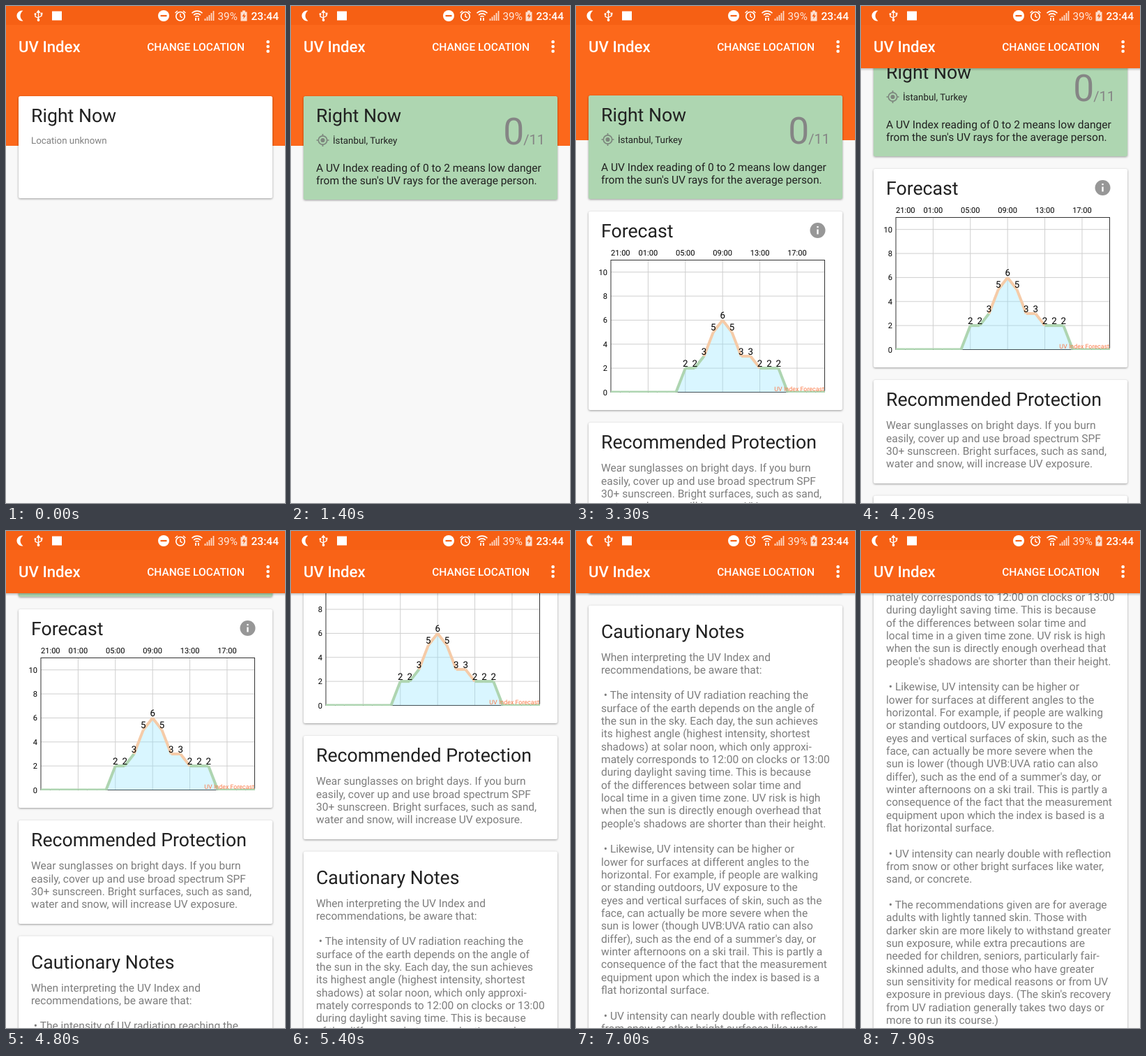
These frames come from a looping animation (400x711 px, 8000 ms). An HTML page:

```html
<!DOCTYPE html>
<html lang="en">
<head>
<meta charset="utf-8">
<title>UV Index</title>
<style>
  html, body { margin: 0; width: 100%; height: 100%; overflow: hidden; background: #f8f8f8; }
  svg { display: block; width: 400px; height: 711px; }
  text { font-family: Roboto, sans-serif; font-size: 15.56px; white-space: pre; text-rendering: geometricPrecision; fill: #212121; }
  .card { fill: #fff; filter: drop-shadow(0 1.5px 1.8px rgba(0, 0, 0, .38)); }
  .title { font-size: 26.67px; }
  .small { font-size: 13.33px; }
  .body text { fill: #7d7d7d; }
  .axis { font-size: 11.1px; fill: #000; }
  .value { font-size: 13.33px; fill: #000; text-anchor: middle; }
  .mid { text-anchor: middle; }
  .end { text-anchor: end; }
  .bar text { fill: #fff; }
  .medium { font-weight: 500; }
  .line { fill: none; stroke: #fff; }
</style>
</head>
<body>
<svg viewBox="0 0 400 711">
  <defs>
    <clipPath id="plot"><rect x="50" y="360" width="307" height="194"/></clipPath>
    <linearGradient id="fade" x2="0" y2="1">
      <stop stop-opacity=".22"/><stop offset="1" stop-opacity="0"/>
    </linearGradient>
  </defs>

  <rect width="400" height="711" fill="#f8f8f8"/>
  <rect id="header" width="400" height="200"/>

  <g id="content">
    <rect id="nowCard" class="card" x="18" y="129" width="364" height="146" rx="2.5"/>
    <text class="title" x="36" y="166">Right Now</text>
    <text id="unknown" class="small" x="36" y="196.5" style="fill:#808080">Location unknown</text>
    <g id="reading">
      <g fill="none" stroke="#7d877e" stroke-width="1.7">
        <circle cx="45.5" cy="192" r="6.2"/>
        <path d="M45.5 183v3M45.5 198v3M36.5 192h3M51.5 192h3"/>
        <circle cx="45.5" cy="192" r="3.1" fill="#7d877e" stroke="none"/>
      </g>
      <text class="small" x="60" y="196.5">İstanbul, Turkey</text>
      <text class="end" x="334.2" y="197.5" style="font-size:53.33px;fill:#858585">0</text>
      <text class="end" x="364" y="197.5" style="font-size:20px;fill:#858585">/11</text>
      <text x="36" y="236.8">A UV Index reading of 0 to 2 means low danger</text>
      <text x="36" y="255.1">from the sun's UV rays for the average person.</text>
    </g>

    <g id="more">
      <rect class="card" x="18" y="295" width="364" height="284" rx="2.5"/>
      <text class="title" x="36" y="332">Forecast</text>
      <circle cx="346.5" cy="322" r="11" fill="#979797"/>
      <path d="M346.5 316v2.3M346.5 320.5v7" stroke="#fff" stroke-width="2.3"/>
      <g id="grid" stroke="#cfcfcf"></g>
      <rect x="50" y="364.5" width="306.5" height="189" fill="none" stroke="#333"/>
      <g clip-path="url(#plot)">
        <path id="area" fill="rgb(140,226,255)" fill-opacity=".33"/>
        <g id="curve" stroke-width="4"></g>
      </g>
      <g id="labels"></g>
      <text class="end" x="356" y="552" style="font-size:8.89px;fill:#fb7a48">UV Index Forecast</text>

      <rect class="card" x="18" y="597" width="364" height="148" rx="2.5"/>
      <text class="title" x="36" y="634">Recommended Protection</text>
      <g id="advice" class="body"></g>

      <rect class="card" x="18" y="762.5" width="364" height="860" rx="2.5"/>
      <text class="title" x="36" y="808.5">Cautionary Notes</text>
      <g id="notes" class="body"></g>
    </g>
  </g>

  <g class="bar">
    <rect id="shade" y="89" width="400" height="4" fill="url(#fade)"/>
    <rect id="toolbar" width="400" height="89"/>
    <rect width="400" height="27" fill="#f66014"/>
    <text class="medium" x="18" y="66" style="font-size:22.22px">UV Index</text>
    <text class="medium end" x="342" y="64">CHANGE LOCATION</text>
    <g fill="#fff">
      <circle cx="375.6" cy="51.3" r="2.3"/><circle cx="375.6" cy="58" r="2.3"/><circle cx="375.6" cy="64.7" r="2.3"/>
      <path d="M24.5 6.8a7.4 7.4 0 1 0 0 14.4a8.5 8.5 0 0 1 0-14.4z"/>
      <rect x="66" y="7.5" width="14" height="13"/>
      <circle cx="226" cy="14" r="8"/>
      <path d="M221.5 14h9" stroke="#f66014" stroke-width="2.2"/>
    </g>
    <g class="line" stroke-width="1.4">
      <path d="M46.5 8v11M42 11.5v3.5l4.5 2.5M51 11v3l-4.5 2.5"/>
      <circle cx="46.5" cy="20" r="1.2" fill="#fff"/><path d="M44.7 9l1.8-2.4l1.8 2.4z" fill="#fff"/>
      <circle cx="42" cy="11.5" r=".8"/><path d="M50.3 10.3h1.4v1.4h-1.4z"/>
      <circle cx="250" cy="14.7" r="6.2" stroke-width="1.7"/>
      <path d="M250 11v4l2.8 1.7M242.5 10l3.5-3M257.5 10l-3.5-3"/>
      <path d="M266.5 10.3a10.5 10.5 0 0 1 15 0M269 13a7 7 0 0 1 10 0M271.5 15.5a3.5 3.5 0 0 1 5 0" stroke-width="1.6"/>
      <path d="M272 17v4M276 17v4" stroke-width="1.8"/>
      <path d="M285.5 21v-3M288.5 21v-5.5M291.5 21v-8M294.5 21v-11M297.5 21v-14" stroke-width="1.7" opacity=".8"/>
    </g>
    <text x="303.5" y="20" style="font-size:15.3px" opacity=".85">39%</text>
    <path d="M336.5 8.5h2.5v-2h4v2h2.5v13h-9z" fill="#fff" opacity=".8"/>
    <path d="M342 10l-3.5 5h2.5l-1 4l4-5.5h-2.5z" fill="#f66014"/>
    <text class="medium end" x="391" y="20">23:44</text>
  </g>
</svg>

<script>
const $ = id => document.getElementById(id);
const LOOP = 8000, STEP = 100, COLLAPSE = 111;

function add(parent, tag, attrs, text = '') {
  const el = document.createElementNS('http://www.w3.org/2000/svg', tag);
  for (const key in attrs) el.setAttribute(key, attrs[key]);
  el.textContent = text;
  return parent.appendChild(el);
}

function paragraph(parent, top, copy) {
  copy.split('\n').forEach((line, i) => {
    if (line) add(parent, 'text', { x: 36, y: top + i * 18.333 }, line);
  });
}

paragraph($('advice'), 667.3, `Wear sunglasses on bright days. If you burn
easily, cover up and use broad spectrum SPF
30+ sunscreen. Bright surfaces, such as sand,
water and snow, will increase UV exposure.`);

paragraph($('notes'), 841.5, `When interpreting the UV Index and
recommendations, be aware that:

 • The intensity of UV radiation reaching the
surface of the earth depends on the angle of
the sun in the sky. Each day, the sun achieves
its highest angle (highest intensity, shortest
shadows) at solar noon, which only approxi-
mately corresponds to 12:00 on clocks or 13:00
during daylight saving time. This is because
of the differences between solar time and
local time in a given time zone. UV risk is high
when the sun is directly enough overhead that
people's shadows are shorter than their height.

 • Likewise, UV intensity can be higher or
lower for surfaces at different angles to the
horizontal. For example, if people are walking
or standing outdoors, UV exposure to the
eyes and vertical surfaces of skin, such as the
face, can actually be more severe when the
sun is lower (though UVB:UVA ratio can also
differ), such as the end of a summer's day, or
winter afternoons on a ski trail. This is partly a
consequence of the fact that the measurement
equipment upon which the index is based is a
flat horizontal surface.

 • UV intensity can nearly double with reflection
from snow or other bright surfaces like water,
sand, or concrete.

 • The recommendations given are for average
adults with lightly tanned skin. Those with
darker skin are more likely to withstand greater
sun exposure, while extra precautions are
needed for children, seniors, particularly fair-
skinned adults, and those who have greater
sun sensitivity for medical reasons or from UV
exposure in previous days. (The skin's recovery
from UV radiation generally takes two days or
more to run its course.)`);

// Hourly forecast, starting at 21:00
const hours = [...'000000002235653322200000'].map(Number);
const px = i => 50 + i * 307 / 23;
const py = v => 553.5 - v * 17.18;

for (let v = 0; v <= 10; v += 2) {
  add($('grid'), 'path', { d: `M50 ${py(v)}H357` });
  add($('labels'), 'text', { class: 'axis end', x: 45, y: py(v) + 4 }, v);
}
for (let i = 0; i < 24; i += 4) {
  if (i) add($('grid'), 'path', { d: `M${px(i)} 364.5V553.5` });
  const label = String((21 + i) % 24).padStart(2, '0') + ':00';
  add($('labels'), 'text', { class: 'axis mid', x: i ? px(i) : 63.8, y: 358 }, label);
}

const segments = hours.slice(1).map((v, i) => add($('curve'), 'path', {
  d: `M${px(i)} ${py(hours[i])}L${px(i + 1)} ${py(v)}`,
  stroke: hours[i] > 2 ? '#f5cba8' : '#aed5b1'
}));
const values = hours.map((v, i) =>
  add($('labels'), 'text', { class: 'value', x: px(i), y: py(v) - 2.3 }, v || ''));

function drawChart(progress) {
  const last = Math.floor(progress * 23 + 1e-6);
  segments.forEach((s, i) => s.style.display = i < last ? '' : 'none');
  values.forEach((s, i) => s.style.display = i <= last ? '' : 'none');
  const top = hours.slice(0, last + 1).map((v, i) => `L${px(i)} ${py(v)}`).join('');
  $('area').setAttribute('d', `M50 ${py(0)}${top}V${py(0)}Z`);
}

// Finger travel over time: [ms, px]
const drag = [[0, 0], [3200, 0], [3300, 8], [4200, 151], [5400, 393.5],
  [6300, 582], [7000, 745], [7200, 745], [7900, 977], [LOOP, 977]];

function travel(t) {
  const i = drag.findIndex(p => p[0] > t);
  const [t0, d0] = drag[i - 1], [t1, d1] = drag[i];
  return d0 + (d1 - d0) * (t - t0) / (t1 - t0);
}

const ramp = (t, from, to) => Math.min(1, Math.max(0, (t - from) / (to - from)));

function draw(t) {
  const found = t < 100 ? 0 : t < 300 ? 0.6 : 1;
  $('unknown').style.opacity = 1 - found;
  $('reading').style.opacity = found;
  $('nowCard').setAttribute('height', found ? 148 : 146);
  $('nowCard').style.fill = `rgb(${255 - 81 * found},${255 - 41 * found},${255 - 78 * found})`;

  $('more').style.opacity = ramp(t, 1400, 1700);
  drawChart(ramp(t, 1400, 2800));

  // The header folds first while the cards creep up, then the cards scroll by whole pixels
  const d = travel(t), fold = Math.min(d, COLLAPSE);
  const shift = Math.floor(fold * 0.2 + d - fold);
  $('content').setAttribute('transform', `translate(0 ${-shift})`);
  $('header').setAttribute('height', 200 - fold);
  const folded = fold === COLLAPSE;
  const orange = folded ? '#f96317' : '#fc681b';
  $('header').setAttribute('fill', orange);
  $('toolbar').setAttribute('fill', orange);
  $('shade').style.opacity = folded ? 1 : 0;
}

const start = performance.now();
function tick() {
  const t = (performance.now() - start) % LOOP;
  draw(Math.floor(t / STEP) * STEP);
  requestAnimationFrame(tick);
}
tick();
</script>
</body>
</html>
```
